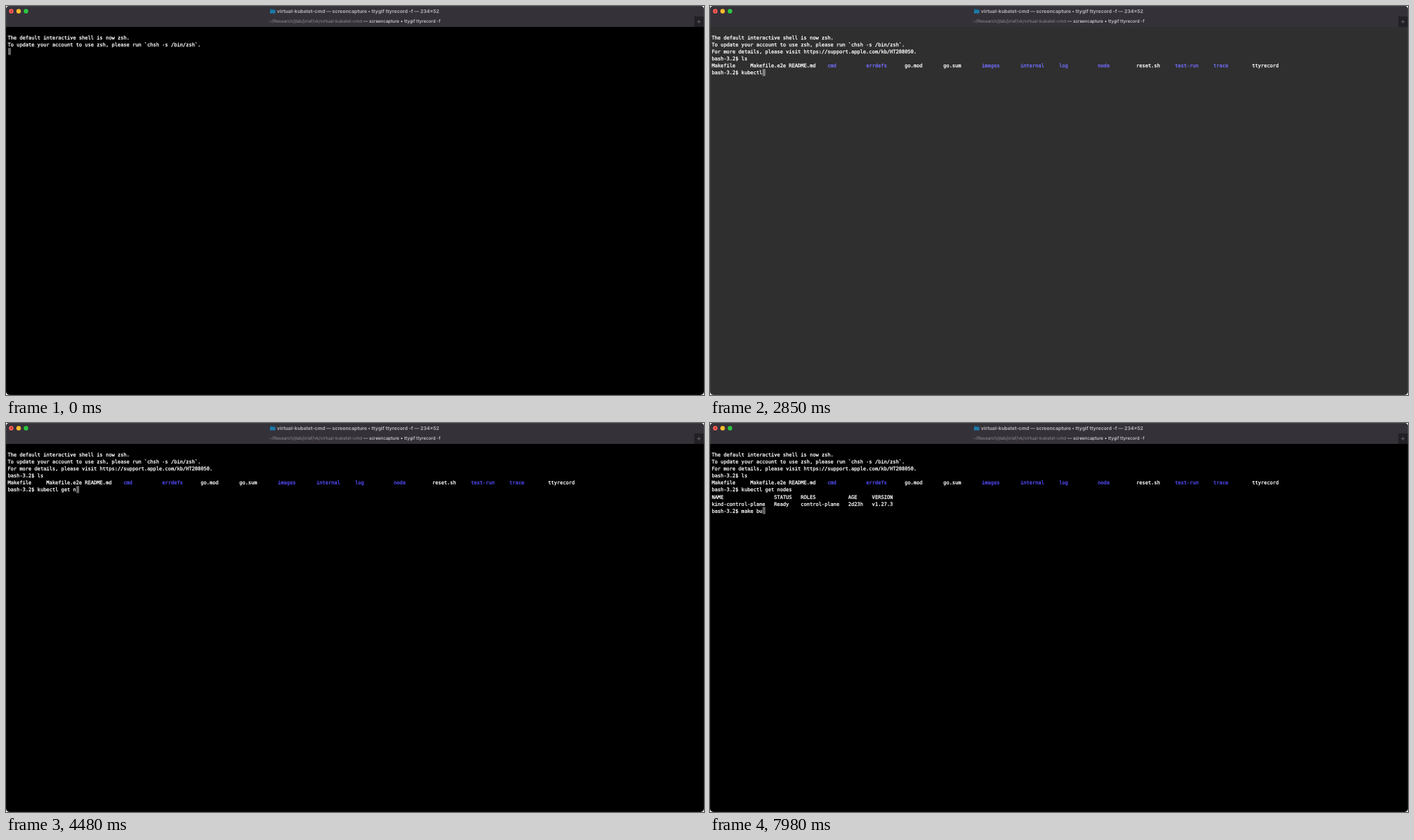
An HTML page that plays this animation: 1002x559 px, repeating every 8000 ms.

```html
<!DOCTYPE html>
<html lang="en">
<head>
<meta charset="utf-8">
<title>Terminal</title>
<style>
  html, body { margin: 0; width: 100%; height: 100%; overflow: hidden; background: #fff; }
  #window {
    position: relative; width: 1002px; height: 559px; overflow: hidden;
    border-radius: 5px; background: #000; text-rendering: geometricPrecision;
  }
  #window::after {
    content: ""; position: absolute; inset: 0; border-radius: 5px;
    box-shadow: inset 0 0 0 .5px rgba(255, 255, 255, .12);
  }
  .bar {
    position: absolute; left: 0; width: 1001px; height: 15px; padding-right: 1px;
    display: flex; justify-content: center; align-items: center;
    background: #353139; white-space: pre; line-height: 15px;
    font-family: Inter, sans-serif;
  }
  #title { top: 0; font-size: 7px; font-weight: 700; color: #b3b0b4; }
  #title svg { margin-right: 2.5px; }
  #tab { top: 15px; font-size: 6.37px; color: #918e93; }
  #tab span { color: #f4f3f4; }
  #lights { position: absolute; left: 0; top: 0; }
  #add { position: absolute; left: 988px; top: 15px; }
  pre {
    position: absolute; left: 2.5px; top: 30.9px; margin: 0; color: #fff;
    font: 7.083px/10.1px "DejaVu Sans Mono", monospace;
    -webkit-text-stroke: .28px;
  }
  pre b { font-weight: 400; color: #544eff; }
  #cursor {
    position: absolute; left: 2.5px; top: 30.4px; width: 4.264px; height: 10.1px;
    background: #676767;
  }
  #bell { position: absolute; inset: 30px 0 0; background: #fff; opacity: 0; }
</style>
</head>
<body>
<div id="window">
  <div id="cursor"></div>
  <pre id="screen"></pre>
  <div id="bell"></div>
  <div class="bar" id="title"><svg width="7.5" height="6.5" viewBox="0 0 7.5 6.5"><path d="M0 .6Q0 0 .6 0H2.6L3.4.8H7Q7.5.8 7.5 1.4V6Q7.5 6.5 7 6.5H.5Q0 6.5 0 6Z" fill="#155f86"/><path d="M0 1.9H7.5V6Q7.5 6.5 7 6.5H.5Q0 6.5 0 6Z" fill="#2079a8"/></svg>virtual-kubelet-cmd — <span class="child">screencapture • </span>ttygif ttyrecord -f — 234×52</div>
  <div class="bar" id="tab">~/Research/jlab/jiriaf/vk/virtual-kubelet-cmd <span>— </span><span class="child">screencapture • </span><span>ttygif ttyrecord -f</span></div>
  <svg id="lights" width="40" height="15">
    <circle cx="7.5" cy="7.5" r="3.2" fill="#fe5f57"/>
    <circle cx="7.5" cy="7.5" r="1" fill="#8c1a10"/>
    <circle cx="18.1" cy="7.5" r="3.2" fill="#febc2e"/>
    <circle cx="28.7" cy="7.5" r="3.2" fill="#28c840"/>
  </svg>
  <svg id="add" width="14" height="15">
    <path d="M0 0H14V15H0Z" fill="#232025"/>
    <path d="M4 7.5H9.4M6.7 4.8V10.2" stroke="#79767b" stroke-width=".7"/>
  </svg>
</div>
<script>
  const LOOP = 8000, CELL = 4.264, ROW = 10.1;
  const PROMPT = "bash-3.2$ ";
  const dirs = /\b(cmd|errdefs|images|internal|log|node|test-run|trace)\b/g;
  const files = ("Makefile Makefile.e2e README.md cmd errdefs go.mod go.sum images " +
    "internal log node reset.sh test-run trace ttyrecord").split(" ");
  const listing = files.map(name => name.padEnd(13)).join("");
  const row = (name, status, roles) => name.padEnd(21) + status.padEnd(9) + roles.padEnd(16);

  // Terminal output: [time in ms, characters]; "\b" deletes one.
  const output = [
    [0, "\nThe default interactive shell is now zsh.\n" +
        "To update your account to use zsh, please run `chsh -s /bin/zsh`.\n"],
    [1340, "For more details, please visit https://support.apple.com/kb/HT208050.\n" + PROMPT + "l"],
    [1430, "s"], [1520, "\n"], [1610, listing + "\n"],
    [2410, PROMPT + "k"], [2630, "u"], [2770, "b"], [2850, "ectl"],
    [3390, "g"], [3760, "\b"], [3900, " "],
    [4050, "g"], [4140, "e"], [4240, "t"], [4330, " "],
    [4480, "n"], [4570, "o"], [4660, "d"], [4810, "e"], [4950, "s"],
    [5210, "\n"], [5290, row("NAME", "STATUS", "ROLES")],
    [7270, "AGE     VERSION\n" + row("kind-control-plane", "Ready", "control-plane") +
           "2d23h   v1.27.3\n" + PROMPT + "m"],
    [7380, "a"], [7490, "k"], [7590, "e"], [7700, " "],
    [7860, "b"], [7980, "u"]
  ];

  const $ = id => document.getElementById(id);
  const children = document.querySelectorAll(".child");
  const within = (t, from, to) => t >= from && t < to;
  let shown = -1;

  function render(t) {
    const count = output.filter(([time]) => time <= t).length;
    if (count === shown) return;
    shown = count;

    let text = "";
    for (const [, chars] of output.slice(0, count))
      text = chars === "\b" ? text.slice(0, -1) : text + chars;
    const lines = text.split("\n"), last = lines.length - 1;
    $("cursor").style.transform =
      `translate(${lines[last].length * CELL}px, ${last * ROW}px)`;
    $("screen").innerHTML = lines
      .map(line => line === listing ? line.replace(dirs, "<b>$1</b>") : line)
      .join("\n");

    // The visual bell fades after a failed completion.
    $("bell").style.opacity = within(t, 2850, 3390) ? .185 : within(t, 3390, 3760) ? .09 : 0;
    const idle = within(t, 3900, 4050);
    children.forEach(el => el.style.display = idle ? "none" : "");
  }

  function tick() {
    render(performance.now() % LOOP);
    requestAnimationFrame(tick);
  }
  tick();
</script>
</body>
</html>
```
